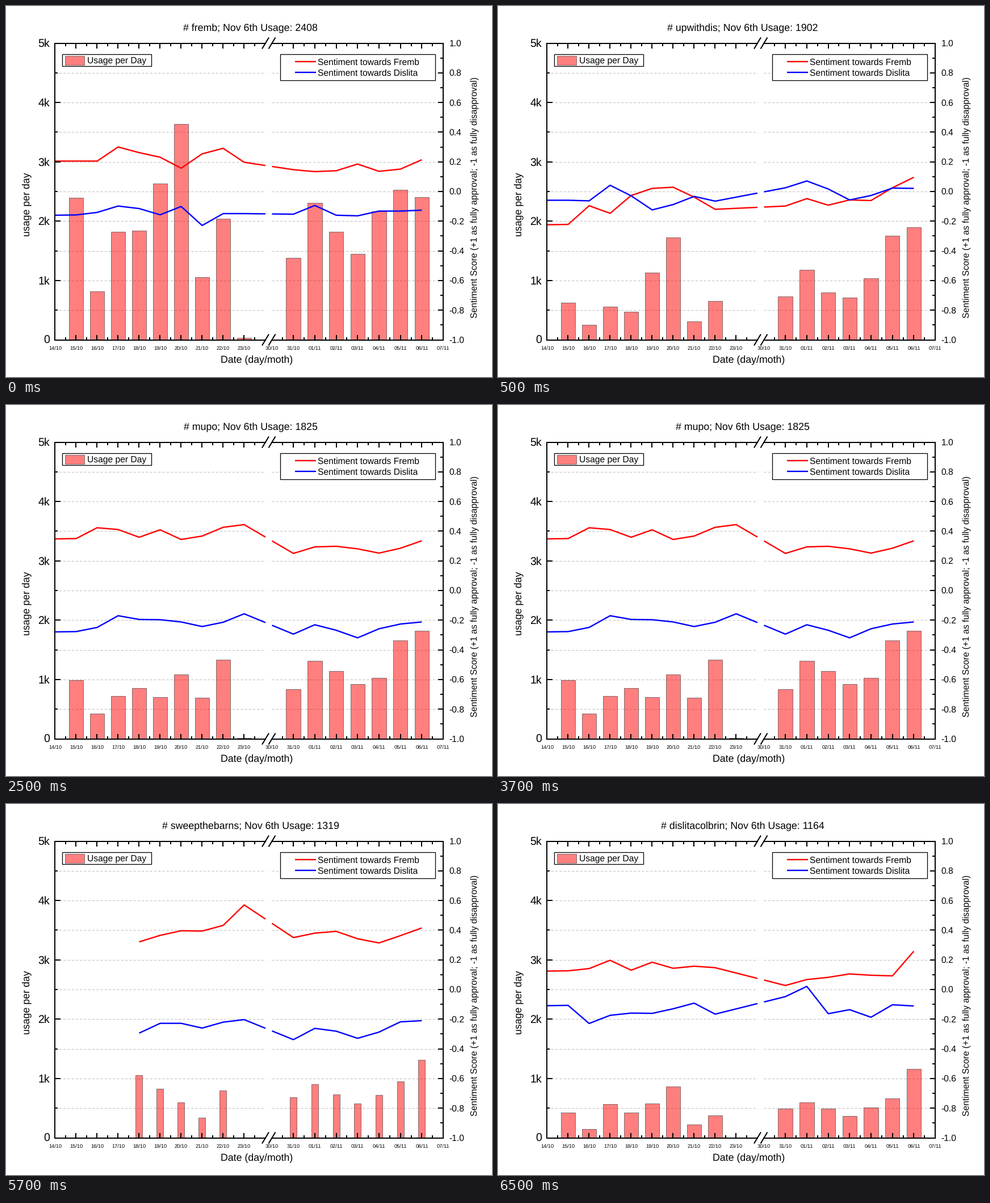
These frames come from a looping animation (856 by 654 pixels, 8 s). A matplotlib script:

```python
import numpy as np
import matplotlib.pyplot as plt
from matplotlib.animation import FuncAnimation
from matplotlib.patches import Rectangle

plt.rcParams["font.family"] = "Liberation Sans"
plt.rcParams["text.hinting"] = "none"

W, H, DPI = 856, 654, 100
PT = 72 / DPI
LEFT, RIGHT, TOP, BOTTOM = 86.5, 770, 65.5, 588.5
GAP = (457, 468.5)
STEP_A, STEP_B = 37, 37.7
EARLY = LEFT + STEP_A * np.arange(10)
LATE = GAP[1] + STEP_B * np.arange(9)
DAYS = np.r_[EARLY, LATE[1:8]]
DATES = [f"{d}/10" for d in (*range(14, 24), 30, 31)] + [f"{d:02}/11" for d in range(1, 8)]
RED, BLUE = "#ff0000", "#0000ff"
NA = np.nan


def usage_y(v):
    return BOTTOM - v * (BOTTOM - TOP) / 5000


def score_y(s):
    """Sentiment in thousandths to a vertical position."""
    return (TOP + BOTTOM) / 2 - s * (BOTTOM - TOP) / 2000


class Scene:
    def __init__(self, tag, bars, first, second, bar_width=25.5):
        self.tag, self.bars, self.bar_width = tag, bars, bar_width
        self.first, self.second = first, second


fremb = Scene(
    "fremb",
    [0, 2395, 813, 1821, 1845, 2634, 3642, 1061, 2038, 38, 1386, 2309, 1817, 1444, 2165, 2526, 2408],
    [205, 205, 205, 300, 262, 231, 157, 254, 291, 197, 147, 134, 140, 185, 136, 151, 214],
    [-160, -158, -141, -98, -115, -157, -101, -229, -149, -149, -153, -94, -160, -164, -132, -132, -126])
upwith = Scene(
    "upwithdis",
    [0, 626, 249, 564, 478, 1133, 1721, 311, 655, 0, 736, 1185, 803, 712, 1042, 1754, 1902],
    [-224, -222, -96, -147, -27, 21, 29, -38, -120, NA, -98, -48, -92, -57, -61, 25, 96],
    [-59, -59, -63, 42, -29, -124, -88, -33, -65, NA, 25, 71, 17, -57, -27, 23, 21])
mupo = Scene(
    "mupo",
    [0, 985, 421, 722, 851, 698, 1085, 693, 1338, 17, 837, 1315, 1142, 927, 1028, 1663, 1825],
    [348, 350, 423, 411, 359, 409, 344, 367, 426, 444, 250, 294, 298, 281, 252, 285, 335],
    [-279, -277, -249, -170, -195, -197, -212, -243, -214, -157, -294, -231, -268, -319, -258, -226, -212])
sweep = Scene(
    "sweepthebarns",
    [0, 0, 0, 0, 1061, 827, 602, 340, 798, 6, 688, 899, 731, 574, 722, 951, 1319],
    [NA, NA, NA, NA, 321, 365, 396, 394, 432, 570, 350, 380, 392, 342, 314, 363, 415],
    [NA, NA, NA, NA, -294, -228, -228, -260, -220, -203, -338, -262, -281, -329, -287, -218, -210],
    bar_width=12)
colbrin = Scene(
    "dislitacolbrin",
    [0, 421, 148, 569, 430, 583, 865, 225, 373, 0, 497, 602, 492, 368, 511, 660, 1164],
    [124, 126, 141, 197, 130, 184, 143, 157, 147, NA, 27, 67, 82, 105, 96, 92, 258],
    [-109, -107, -229, -174, -159, -161, -130, -92, -166, NA, -48, 21, -163, -136, -187, -103, -111])
SCENES = (fremb, upwith, mupo, sweep, colbrin)

fig = plt.figure(figsize=(W / DPI, H / DPI), dpi=DPI, facecolor="white")
ax = fig.add_axes([0, 0, 1, 1])
ax.set(xlim=(0, W), ylim=(H, 0))
ax.axis("off")


def text(x, y, s, px, ha="left", **kw):
    return ax.text(x, y, s, fontsize=px * PT, ha=ha, va="baseline", color="black", zorder=8, **kw)


def line(xs, ys, color="black", px=2, z=5, **kw):
    return ax.plot(xs, ys, color=color, lw=px * PT, zorder=z, **kw)[0]


def box(x0, y0, x1, y1, face, edge="black", px=1.3, z=6):
    return ax.add_patch(Rectangle((x0, y0), x1 - x0, y1 - y0, fc=face, ec=edge, lw=px * PT, zorder=z))


def bar(x0, y0, x1, y1, z=2):
    return box(x0, y0, x1, y1, (1, 0, 0, 0.5), (0.2, 0.2, 0.2, 0.6), 1, z)


def draw_axes():
    for x0, x1 in ((LEFT, GAP[0]), (GAP[1], RIGHT)):
        for y in (TOP, BOTTOM):
            line([x0, x1], [y, y])
        for k in range(1, 10):
            y = usage_y(500 * k)
            line([x0, x1], [y, y], "#c3c3c3", 1.1, 1, dashes=(4, 2.6))
    for x in (LEFT, RIGHT):
        line([x, x], [TOP, BOTTOM], solid_capstyle="projecting")

    ticks = [(x, 9) for x in (*EARLY[1:], *LATE[1:-1])]
    ticks += [(x + STEP_A / 2, 5) for x in EARLY] + [(x + STEP_B / 2, 5) for x in LATE[:-1]]
    for x, size in ticks:
        line([x, x], [TOP, TOP + size], solid_capstyle="butt")
        line([x, x], [BOTTOM, BOTTOM - size], solid_capstyle="butt")
    for k in range(1, 10):
        y = usage_y(500 * k)
        line([LEFT, LEFT + (5 if k % 2 else 10)], [y, y], solid_capstyle="butt")
    for k in range(1, 20):
        y = score_y(100 * k - 1000)
        line([RIGHT, RIGHT - (5 if k % 2 else 9)], [y, y], solid_capstyle="butt")
    for x in GAP:
        for y in (TOP, BOTTOM):
            line([x - 6, x + 6], [y + 10, y - 10], solid_capstyle="butt")

    for k in range(6):
        text(77, usage_y(1000 * k) + 6.7, f"{k}k" if k else "0", 19.6, "right")
    for k in range(-5, 6):
        text(780.5, score_y(200 * k) + 5.3, f"{k / 5:.1f}", 15.6)
    for x, date in zip((*EARLY, *LATE), DATES):
        text(x, 605.8, date, 9.3, "center")
    text(441.3, 628, "Date (day/moth)", 17.7, "center")
    side = dict(rotation=90, rotation_mode="anchor")
    text(41.5, 350, "usage per day", 17.7, "center", **side)
    text(829.5, 337.5, "Sentiment Score (+1 as fully approval; -1 as fully disapproval)",
         15.6, "center", **side)


def draw_legends():
    box(99.5, 84.5, 256.5, 105.5, "white")
    bar(104.5, 87.5, 138.5, 103.5, z=7)
    text(143, 100.5, "Usage per Day", 15.6)
    box(483.5, 84.5, 756.5, 131, "white")
    for y, color, name in ((98, RED, "Fremb"), (117.3, BLUE, "Dislita")):
        line([509.5, 546.5], [y, y], color, 2.4, 7, solid_capstyle="butt")
        text(549.5, y + 5.6, f"Sentiment towards {name}", 15.6)


def trend(scores):
    """Polyline through the known days, interrupted at the axis break."""
    scores = np.array(scores, float)
    known = ~np.isnan(scores)
    xs, ys = DAYS[known], score_y(scores[known])
    cut = np.searchsorted(xs, GAP[0])
    edges = np.interp(GAP, xs, ys)
    return (np.insert(xs, [cut] * 3, [GAP[0], NA, GAP[1]]),
            np.insert(ys, [cut] * 3, [edges[0], NA, edges[1]]))


draw_axes()
draw_legends()
title = text(430.8, 43, "", 17.75, "center")
bars = [bar(x, BOTTOM, x, BOTTOM) for x in DAYS]
trends = [line([], [], c, 2.4, 4, solid_capstyle="butt", solid_joinstyle="round")
          for c in (RED, BLUE)]


def update(i):
    t = i * 500
    scene = SCENES[(t + 1500) // 2000]
    title.set_text(f"# {scene.tag}; Nov 6th Usage: {scene.bars[-1]}")
    for patch, x, v in zip(bars, DAYS, scene.bars):
        patch.set_bounds(x - scene.bar_width / 2, usage_y(v), scene.bar_width, BOTTOM - usage_y(v))
        patch.set_visible(v > 0)
    for curve, scores in zip(trends, (scene.first, scene.second)):
        curve.set_data(*trend(scores))
    return [title, *bars, *trends]


anim = FuncAnimation(fig, update, frames=16, interval=500, repeat=True, repeat_delay=0, blit=False)
plt.show()
```
